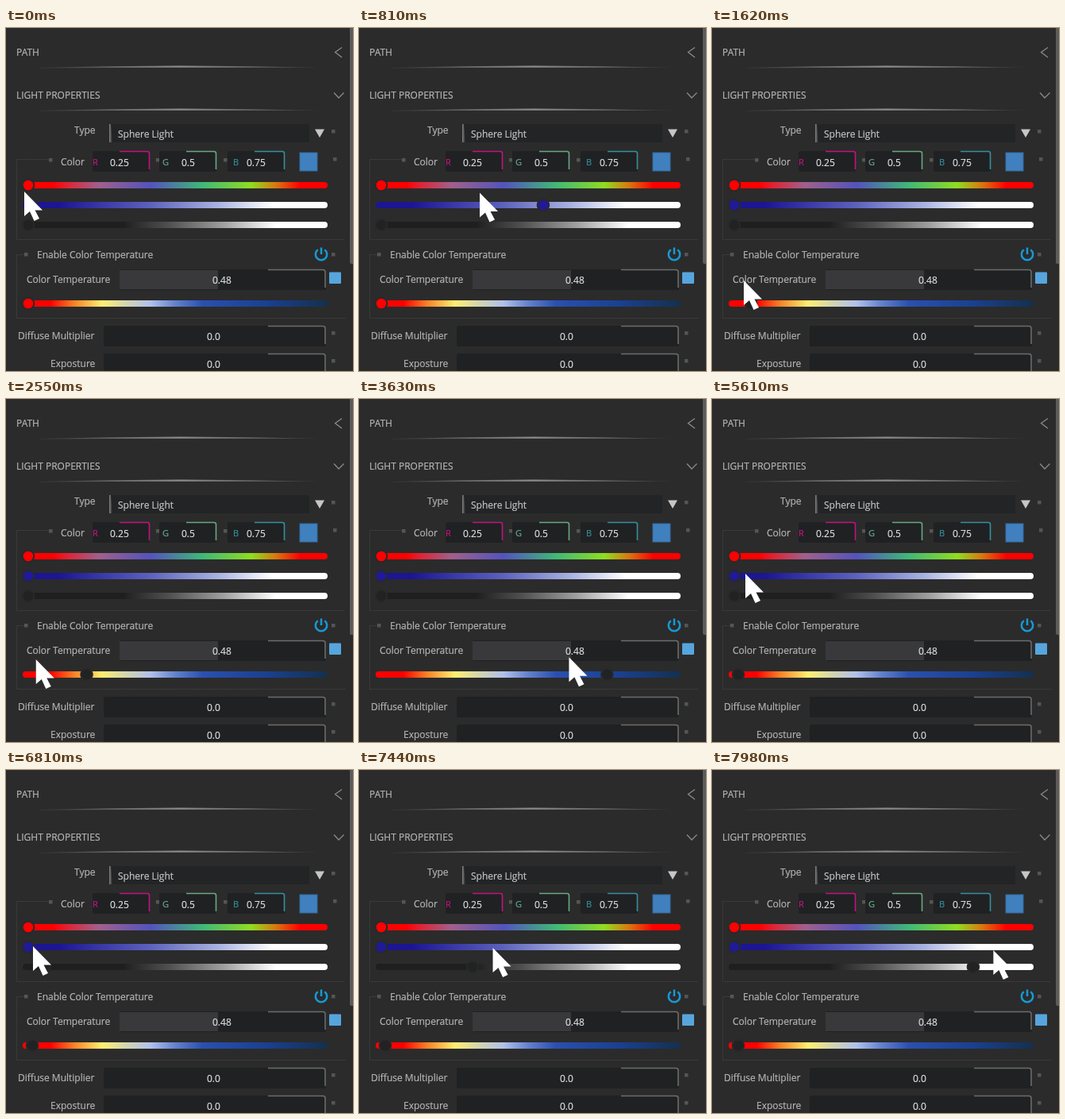
These frames come from a looping animation (437x432 px, 8 s). An HTML page:

```html
<!DOCTYPE html>
<html lang="en">
<head>
<meta charset="utf-8">
<title>Light properties</title>
<style>
  html, body { margin: 0; width: 100%; height: 100%; overflow: hidden; background: #2b2b2b; }
  svg { display: block; width: 437px; height: 432px; }
  text { font: 12px "Open Sans", "Noto Sans", sans-serif; fill: #b4b4b4; stroke: #b4b4b4; stroke-width: .2px; }
  .value { fill: #dedede; stroke: #dedede; }
  .field { fill: #1f2123; }
  .dot { fill: #555; }
  .frame { fill: none; stroke: #484848; stroke-dasharray: 1 1; }
  .chevron { fill: none; stroke: #8a8a8a; stroke-width: 1.3; }
  .edge { fill: none; stroke-width: 1.6; }
  .knob { stroke: #292929; stroke-width: 2; }
</style>
</head>
<body>
<svg viewBox="0 0 437 432">
  <defs>
    <linearGradient id="hue">
      <stop offset=".1" stop-color="#f00"/>
      <stop offset=".15" stop-color="#dc2638"/>
      <stop offset=".25" stop-color="#a0608c"/>
      <stop offset=".42" stop-color="#5353bd"/>
      <stop offset=".59" stop-color="#40b878"/>
      <stop offset=".75" stop-color="#90dc20"/>
      <stop offset=".83" stop-color="#d87810"/>
      <stop offset=".91" stop-color="#f00"/>
    </linearGradient>
    <linearGradient id="saturation">
      <stop offset=".12" stop-color="#1c1692"/>
      <stop offset=".42" stop-color="#5d62bd"/>
      <stop offset=".64" stop-color="#a8b2e0"/>
      <stop offset=".82" stop-color="#fff"/>
    </linearGradient>
    <linearGradient id="brightness">
      <stop offset=".33" stop-color="#1f1f1f"/>
      <stop offset=".48" stop-color="#505050"/>
      <stop offset=".66" stop-color="#a0a0a0"/>
      <stop offset=".83" stop-color="#fff"/>
    </linearGradient>
    <linearGradient id="temperature">
      <stop offset=".09" stop-color="#f00"/>
      <stop offset=".17" stop-color="#f88428"/>
      <stop offset=".26" stop-color="#ffee72"/>
      <stop offset=".33" stop-color="#d8d8a8"/>
      <stop offset=".42" stop-color="#b0c0ec"/>
      <stop offset=".5" stop-color="#6482cc"/>
      <stop offset=".59" stop-color="#2a50b0"/>
      <stop offset=".8" stop-color="#1a4090"/>
      <stop offset="1" stop-color="#14304e"/>
    </linearGradient>
    <linearGradient id="ridge">
      <stop offset="0" stop-color="#3a3a3a"/>
      <stop offset=".5" stop-color="#8c8c8c"/>
      <stop offset="1" stop-color="#3a3a3a"/>
    </linearGradient>
    <linearGradient id="slant">
      <stop offset="0" stop-color="#858585"/>
      <stop offset="1" stop-color="#232323"/>
    </linearGradient>
  </defs>

  <rect width="437" height="432" fill="#2b2b2b"/>
  <rect x="433" y="-4" width="6" height="301" rx="2" fill="#5c5c5c"/>

  <text x="13" y="35">PATH</text>
  <text x="13" y="89" textLength="">LIGHT PROPERTIES</text>
  <path class="chevron" d="M423 24.500L414.500 30.500L423 37M413 81.500L419 88L425.500 81.500"/>
  <path id="rule" fill="url(#ridge)" d="M42 50Q130 47.600 220 47.400Q310 47.600 398 50Q310 49.800 220 49.800Q130 49.800 42 50.600Z"/>
  <use href="#rule" y="54"/>

  <text x="86" y="133">Type</text>
  <rect x="131" y="121" width="251" height="23" fill="#232425"/>
  <path fill="url(#slant)" d="M130 121H132L134 144H130Z"/>
  <text class="value" x="141" y="138" style="fill:#c4c4c4;stroke:#c4c4c4">Sphere Light</text>
  <path fill="#c6c6c6" d="M389 127.500H401L395 138Z"/>

  <path class="frame" d="M53 165.500H13.500V266.500H427"/>
  <path class="frame" d="M23 285.500H13.500V365.500H427"/>
  <g id="dots"></g>

  <text x="69" y="173">Color</text>
  <g id="channels"></g>
  <rect x="370" y="157" width="22" height="23" fill="#4080bf" stroke="#356a9e"/>

  <text x="39" y="290">Enable Color Temperature</text>
  <path fill="none" stroke="#1799d6" stroke-width="2.500" d="M392.800 279.200A7.200 7.200 0 1 0 401.200 279.200M397 276.500V285"/>

  <text x="26" y="321">Color Temperature</text>
  <text x="15" y="392">Diffuse Multiplier</text>
  <text x="56" y="427">Exposture</text>
  <g id="fields"></g>
  <rect x="407" y="307.500" width="15" height="14.500" rx="1" fill="#57a5dd"/>

  <g id="sliders"></g>
  <path id="cursor" fill="#fff" d="M0 0V31L7 25L12.500 37L19 34L13.500 23.500H23Z"/>
</svg>

<script>
const byId = id => document.getElementById(id);
const fill = (id, items, draw) => byId(id).innerHTML = items.map(draw).join("");

fill("dots", [[412, 130], [414, 165], [56, 166], [191, 166], [276, 166], [25, 285], [412, 285], [412, 384], [412, 419]],
  ([x, y]) => `<rect class="dot" x="${x - 2}" y="${y - 2}" width="4.500" height="4.500"/>`);

fill("channels", [["R", "0.25", 109, 109, 131, "#c4127f"], ["G", "0.5", 193, 197, 221, "#68a880"], ["B", "0.75", 279, 286, 303, "#368f9e"]],
  ([name, value, x, nameX, valueX, color]) => `
    <rect class="field" x="${x}" y="155" width="72" height="26" rx="2"/>
    <path class="edge" stroke="${color}" d="M${x + 34} 155.500H${x + 69}Q${x + 71.500} 155.500 ${x + 71.500} 158V178"/>
    <text x="${nameX}" y="173" style="fill:${color};stroke:${color};font-size:11px">${name}</text>
    <text class="value" x="${valueX}" y="174">${value}</text>`);

fill("fields", [["0.48", 143, 304, 124], ["0.0", 123, 375, 0], ["0.0", 123, 410, 0]],
  ([value, x, y, filled]) => `
    <rect class="field" x="${x}" y="${y}" width="${403 - x}" height="26" rx="2"/>
    <rect x="${x}" y="${y + 1}" width="${filled}" height="24" fill="#39393b"/>
    <path class="edge" stroke="#6c6c6c" d="M330 ${y + .5}H399Q402 ${y + .5} 402 ${y + 3}V${y + 23}"/>
    <text class="value" x="${value === "0.48" ? 260 : 253}" y="${y + 18}">${value}</text>`);

fill("sliders", [["hue", 198, "#f00"], ["saturation", 223, "#211a96"], ["brightness", 248, "#212223"], ["temperature", 347, "#f00"]],
  ([name, y, color]) => `
    <rect x="21" y="${y - 4}" width="384" height="8" rx="4" fill="url(#${name})"/>
    <circle class="knob" id="${name}-knob" cx="28" cy="${y}" r="7.300" fill="${color}"/>`);

// Pointer path: time in ms, x, y
const path = [
  [0, 23, 206], [150, 23, 206], [560, 330, 208], [1000, 18, 207], [1100, 18, 208],
  [1450, 40, 318], [1640, 40, 318], [2060, 308, 324], [2550, 38, 328], [2600, 26, 328], [2760, 26, 327],
  [3450, 335, 326], [4230, 31, 323], [4400, 31, 323], [4500, 24, 323], [4850, 24, 322],
  [5450, 42, 220], [5620, 42, 220], [5720, 24, 220], [6200, 335, 221], [6720, 34, 222],
  [7050, 34, 222], [7980, 354, 227], [8000, 361, 227]
];
const LOOP = 8000, LAG = 100;

function pointer(t) {
  const i = Math.max(1, path.findIndex(p => p[0] >= t));
  const [t0, x0, y0] = path[i - 1], [t1, x1, y1] = path[i];
  const u = Math.max(0, (t - t0) / (t1 - t0));
  return [x0 + (x1 - x0) * u, y0 + (y1 - y0) * u];
}

// The dragged knob trails the pointer, and stays where it was released
function dragged(t, start, end) {
  if (t < start) return 28;
  const [x] = pointer(Math.min(t, end) - LAG);
  return Math.min(397, Math.max(28, x + 9));
}

function render(now) {
  const t = now % LOOP;
  const [x, y] = pointer(t);
  byId("cursor").setAttribute("transform", `translate(${x} ${y})`);
  byId("saturation-knob").setAttribute("cx", dragged(t, 0, 1150));
  byId("brightness-knob").setAttribute("cx", dragged(t, 5720, LOOP));
  const temperature = byId("temperature-knob");
  temperature.setAttribute("cx", dragged(t, 1560, 4700));
  temperature.setAttribute("fill", t < 1560 ? "#f00" : "#212223");
}

const begin = performance.now();
function tick() {
  render(performance.now() - begin);
  requestAnimationFrame(tick);
}
tick();
</script>
</body>
</html>
```
